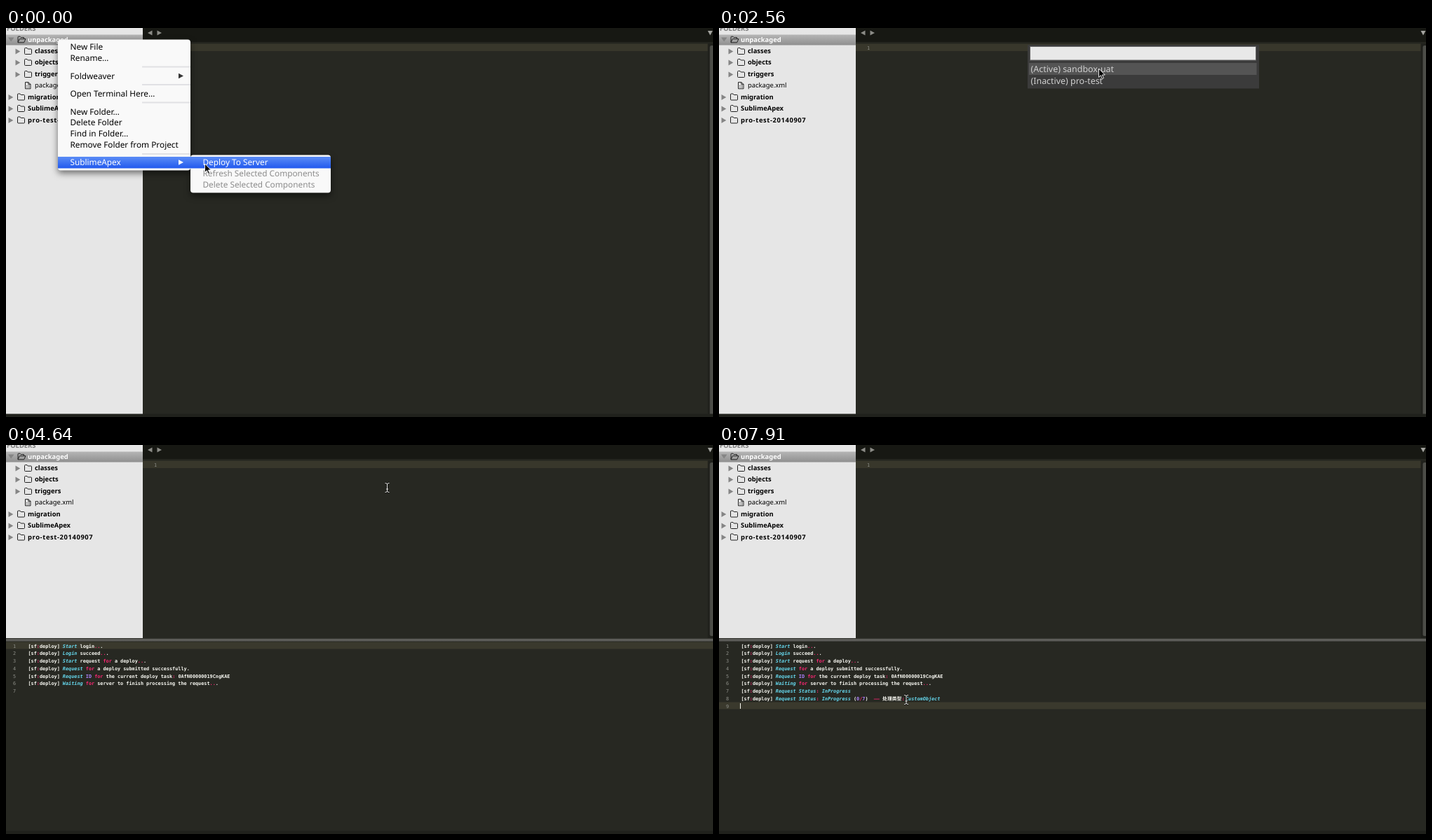
Write an HTML page that moves like this. It is 1008 by 556 pixels and loops after 8000 ms.

```html
<!DOCTYPE html>
<html lang="en">
<head>
<meta charset="utf-8">
<title>Deploy to server</title>
<style>
  html, body { margin: 0; width: 100%; height: 100%; overflow: hidden; background: #272822; }
  svg { display: block; width: 100%; height: 100%; cursor: none; }
  text { font-family: "Noto Sans", "Open Sans", sans-serif; text-rendering: geometricPrecision; white-space: pre; }
  .tree { font-size: 9.4px; font-weight: 700; }
  .menu { font-size: 11.8px; }
  .panel { font-size: 12.45px; fill: #d0d0d0; }
  .code { font: 700 6.834px "DejaVu Sans Mono", "Noto Sans CJK SC", "Noto Sans CJK", monospace; fill: #f8f8f2; }
  .num { font: 6.834px "DejaVu Sans Mono", monospace; fill: #8f908a; text-anchor: end; }
  .type { fill: #66d9ef; font-style: italic; }
  .op { fill: #f92672; }
  .const { fill: #ae81ff; }
  .shadow { filter: drop-shadow(0 4px 5px #0008); }
</style>
</head>
<body>
<svg viewBox="0 0 1008 556">
  <defs>
    <linearGradient id="selected" x2="0" y2="1"><stop stop-color="#b5b5b5"/><stop offset="1" stop-color="#8f8f8f"/></linearGradient>
    <linearGradient id="blue" x2="0" y2="1"><stop stop-color="#5c8df6"/><stop offset="1" stop-color="#2159ee"/></linearGradient>
    <linearGradient id="divider" x2="0" y2="1"><stop stop-color="#44443f"/><stop offset=".5" stop-color="#686865"/><stop offset="1" stop-color="#3a3a36"/></linearGradient>
    <g id="folder" fill="none" stroke="#222" stroke-linejoin="round">
      <path d="M.5-3.5q0-1 1-1H4l1.2 1.5H9.5q1 0 1 1V3.5q0 1-1 1h-8q-1 0-1-1Z"/>
    </g>
    <g id="openFolder" fill="none" stroke="#222" stroke-linejoin="round">
      <path d="M1 4V-3.5q0-.8.8-.8H4l1.2 1.3H9.5V-1M1 4.3 3.3-.9H12L9.6 4.3Z"/>
    </g>
    <g id="file" fill="none" stroke="#222">
      <path d="M1-4.5H5.5L8.5-1.5V4.8H1ZM5.3-4.5V-1.5H8.5M2.8.5H4M5.5.5H7M2.8 2.7H4M5.5 2.7H7"/>
    </g>
  </defs>

  <rect width="1008" height="556" fill="#272822"/>
  <rect x="195" width="813" height="20" fill="#171813"/>
  <rect x="195" y="20" width="813" height="2.5" fill="#24251f"/>
  <rect x="195" y="22.5" width="806" height="10.5" fill="#38372b"/>
  <path d="M202 7 208.500 3.500V10.500ZM222 7 215.500 3.500V10.500Z" fill="#8c8c87"/>
  <path d="M1000.500 4H1007.500L1004 10.500Z" fill="#a4a4a0"/>
  <rect x="1000.500" y="22.500" width="7.500" height="534" fill="#20211c"/>
  <rect id="thumb" x="1003.500" y="25" width="6" rx="2.500" fill="#4c4d48"/>
  <text class="num" x="215" y="31.400">1</text>
  <rect id="editorCaret" x="232" y="25" width="1" height="8" fill="#f8f8f0"/>

  <rect width="195" height="556" fill="#e6e6e6"/>
  <text class="tree" x="1" y="4.300" fill="#7b7b7b">FOLDERS</text>
  <rect y="9.500" width="195" height="15" fill="url(#selected)"/>
  <g id="tree"></g>

  <g id="console">
    <rect y="276" width="1008" height="280" fill="#272822"/>
    <rect y="276.500" width="1008" height="4.500" fill="url(#divider)"/>
    <rect id="activeLine" width="1008" height="10" fill="#3a392d"/>
    <g id="log"></g>
    <rect id="consoleCaret" x="30" y="369" width="1" height="8" fill="#f8f8f0"/>
  </g>
  <rect y="551.500" width="1008" height="4.500" fill="#20211c"/>

  <g id="panel">
    <rect x="440" y="24" width="330" height="62.500" fill="#3b3b3b"/>
    <rect x="443.500" y="26.500" width="322" height="19.500" fill="#e8e8e8" stroke="#666"/>
    <rect x="442" y="50" width="324.500" height="17" fill="#545454"/>
    <text class="panel" x="444.500" y="63.200">(Active) sandbox-uat</text>
    <text class="panel" x="444.500" y="79.800">(Inactive) pro-test</text>
  </g>

  <g id="menu"></g>

  <path id="arrow" d="M0 0V12.300L2.900 9.700 5 14.500 7 13.600 4.900 9H8.800Z" fill="#000" stroke="#fff" stroke-width=".9"/>
  <g id="beam" fill="none">
    <path d="M-3-6.500Q0-6.500 0-5Q0-6.500 3-6.500M0-5V5M-3 6.500Q0 6.500 0 5Q0 6.500 3 6.500M-1.500 2H1.500" stroke="#111" stroke-width="2.400"/>
    <path d="M-3-6.500Q0-6.500 0-5Q0-6.500 3-6.500M0-5V5M-3 6.500Q0 6.500 0 5Q0 6.500 3 6.500M-1.500 2H1.500" stroke="#e8e8e4"/>
  </g>
</svg>
<script>
const $ = id => document.getElementById(id);
const LOOP = 8000;

// Sidebar: label, depth, vertical centre, icon
const tree = [
  ['unpackaged', 0, 16.5, 'openFolder'], ['classes', 1, 33, 'folder'],
  ['objects', 1, 49, 'folder'], ['triggers', 1, 66, 'folder'],
  ['package.xml', 1, 82, 'file'], ['migration', 0, 98.5, 'folder'],
  ['SublimeApex', 0, 115, 'folder'], ['pro-test-20140907', 0, 131.5, 'folder'],
];
$('tree').innerHTML = tree.map(([label, depth, y, icon]) => {
  const x = depth * 10;
  const open = icon === 'openFolder', file = icon === 'file';
  const mark = open ? 'M3 13.500H11.500L7.200 19.500Z' : `M${x + 3.5} ${y - 3.5}v8l6.800-4Z`;
  const style = `fill="${open ? '#fff' : '#000'}"` + (file ? ' font-weight="400" style="font-weight:400"' : '')
    + (/\d/.test(label) ? ' letter-spacing=".6"' : '');
  return (file ? '' : `<path d="${mark}" fill="#858585"/>`)
    + `<use href="#${icon}" x="${x + (file ? 16.5 : 16)}" y="${y}"/>`
    + `<text class="tree" x="${x + 31}" y="${y + 3.2}" ${style}>${label}</text>`;
}).join('');

// Context menu and its submenu
const menuText = (label, x, y, fill = '#000') =>
  `<text class="menu" x="${x}" y="${y + 4}" fill="${fill}">${label}</text>`;
const menuArrow = (y, fill) => `<path d="M246 ${y - 3.7}v7.400l7-3.700Z" fill="${fill}"/>`;
const items = [
  ['New File', 27], ['Rename…', 43], ['Foldweaver', 68.5], ['Open Terminal Here…', 94],
  ['New Folder…', 119.5], ['Delete Folder', 135], ['Find in Folder…', 151],
  ['Remove Folder from Project', 167],
];
$('menu').innerHTML = `
  <g class="shadow">
    <rect x="74" y="16.500" width="189" height="187" rx="4" fill="#f9f9f9"/>
    <rect x="263" y="181.500" width="200" height="54" rx="4" fill="#f9f9f9"/>
  </g>`
  + [55.5, 81, 106.5, 180].map(y => `<rect x="194" y="${y - 1}" width="69" height="2" fill="#e1e1e4"/>`).join('')
  + '<rect x="74" y="184" width="389" height="16.500" fill="url(#blue)"/>'
  + items.map(([label, y]) => menuText(label, 91.5, y)).join('')
  + menuArrow(68.5, '#333') + menuArrow(192, '#fff')
  + menuText('SublimeApex', 91.5, 192, '#fff') + menuText('Deploy To Server', 280.5, 192, '#fff')
  + menuText('Refresh Selected Components', 280.5, 208, '#8c8c8c')
  + menuText('Delete Selected Components', 280.5, 224, '#8c8c8c');

// Log lines: *type*, ~operator~, ^constant^
const highlight = s => s
  .replace(/\*(.+?)\*/g, '<tspan class="type">$1</tspan>')
  .replace(/~(.+?)~/g, '<tspan class="op">$1</tspan>')
  .replace(/\^(.+?)\^/g, '<tspan class="const">$1</tspan>');
const log = [
  '*Start* login~..~.',
  '*Login* succeed~..~.',
  '*Start* request ~for~ a deploy~..~.',
  '*Request* ~for~ a deploy submitted successfully.',
  '*Request* ^ID^ ~for~ the current deploy task~:~ 0AfN00000019CngKAE',
  '*Waiting* ~for~ server to finish processing the request~..~.',
  '*Request Status*~:~ *InProgress*',
  '*Request Status*~:~ *InProgress* (^0^~/~^7^)  ~——~ 处理类型~:~',
];
const baseline = row => 289.6 + row * 10.75;
const rows = [...log, ''].map((line, i) => {
  const row = document.createElementNS('http://www.w3.org/2000/svg', 'g');
  const tail = i === 7 ? `<text class="code type" x="266" y="${baseline(i)}">CustomObject</text>` : '';
  row.innerHTML = `<text class="num" x="14" y="${baseline(i)}">${i + 1}</text>`
    + `<text class="code" x="31.500" y="${baseline(i)}">${highlight('[sf~:~deploy] ' + line)}</text>` + tail;
  $('log').append(row);
  return row;
});

// Held values: [start time, value...]
const pointer = [
  [0, 283.5, 194], [150, 288.5, 194], [1370, 345, 158], [1520, 478, 82], [1660, 563.5, 33.5],
  [1810, 561, 36], [1960, 557, 40], [2110, 551, 46], [2260, 546, 52], [2410, 542, 57],
  [2560, 541.5, 58], [3000, 543.5, 61], [5090, 515, 95], [5240, 400, 240], [5380, 295, 345], [5520, 267, 364],
];
const menuOpacity = [[0, 1], [630, .055], [770, 0]];
const editorBlink = [
  [0, 0], [3000, 1], [3450, .5], [3600, 0], [4050, .5], [4200, 1], [4490, .5], [4640, 0],
  [5090, .5], [5240, 1], [5520, 0], [6110, 1], [6560, 0],
];
const consoleBlink = [[0, 0], [6560, .5], [6710, 1], [7160, .5], [7310, 0], [7760, .5], [7910, 1]];
const lineCount = [[0, 0], [3150, 3], [4490, 4], [4640, 6], [5240, 7], [6560, 8]];

const held = (steps, t) => steps.findLast(([start]) => start <= t).slice(1);
const show = (el, on) => el.setAttribute('visibility', on ? 'inherit' : 'hidden');

function draw(t) {
  const [x, y] = held(pointer, t);
  for (const id of ['arrow', 'beam']) $(id).setAttribute('transform', `translate(${x} ${y})`);
  show($('arrow'), t < 3000);
  show($('beam'), t >= 3000);

  $('menu').setAttribute('opacity', held(menuOpacity, t)[0]);
  show($('panel'), t >= 770 && t < 3000);

  const deploying = t >= 3150;
  show($('console'), deploying);
  $('thumb').setAttribute('height', deploying ? 248 : 535);
  $('activeLine').setAttribute('y', t < 6560 ? 281.5 : 367.5);
  $('editorCaret').setAttribute('opacity', held(editorBlink, t)[0]);
  $('consoleCaret').setAttribute('opacity', held(consoleBlink, t)[0]);

  const [count] = held(lineCount, t);
  rows.forEach((row, i) => {
    show(row, i <= count);
    show(row.children[1], i < count);
  });
}

const begin = performance.now();
(function tick() {
  draw((performance.now() - begin) % LOOP);
  requestAnimationFrame(tick);
})();
</script>
</body>
</html>
```
